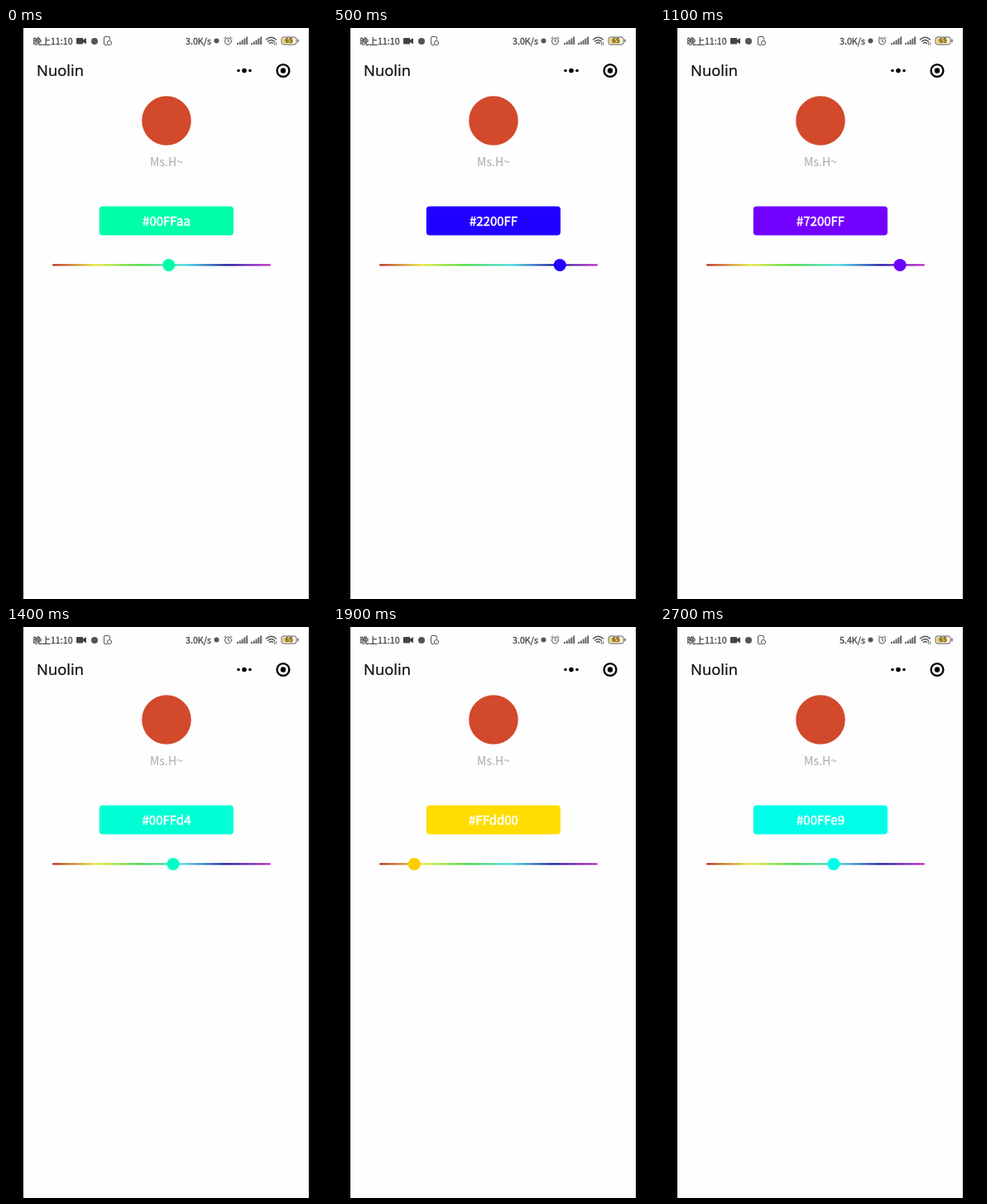
Recreate the animation shown at these times as an HTML page. Size 388 by 690 pixels, loop 2800 ms.

```html
<!DOCTYPE html>
<html lang="zh-CN">
<head>
<meta charset="utf-8">
<style>
  html, body { margin: 0; height: 100%; overflow: hidden; background: #000; }
  svg { display: block; width: 388px; height: 690px; font-family: "Noto Sans CJK SC", "Noto Sans CJK JP", "Noto Sans", sans-serif; }
  .line { fill: none; stroke: #555; stroke-linecap: round; stroke-linejoin: round; }
  .bars { fill: none; stroke: #666; stroke-width: 2; }
  .status { font-size: 10.7px; fill: #444; stroke: #444; stroke-width: .3px; }
  .title { font: 18.3px "Noto Sans", sans-serif; fill: #111; stroke: #111; stroke-width: .2px; }
  .label { font-size: 15px; fill: #fff; stroke: #fff; stroke-width: .5px; }
</style>
</head>
<body>
<svg viewBox="0 0 388 690">
  <defs>
    <linearGradient id="rainbow">
      <stop offset="0" stop-color="#b82418"/>
      <stop offset=".2" stop-color="#e8e838"/>
      <stop offset=".4" stop-color="#40d840"/>
      <stop offset=".6" stop-color="#48dce0"/>
      <stop offset=".8" stop-color="#1414a0"/>
      <stop offset="1" stop-color="#c428c4"/>
    </linearGradient>
    <path id="signal" class="bars" d="M0 20v-2M2.800 20v-3.500M5.600 20v-5.500M8.400 20v-7.500M11.200 20v-9.500"/>
  </defs>
  <rect x="21" width="345" height="690" fill="#fdfefd"/>

  <!-- status bar -->
  <text class="status" x="32.5" y="19.5">晚上11:10</text>
  <path d="M86 12h7v2.200l4-2v7l-4-2v2.300h-7q-1 0-1-1v-5.500q0-1 1-1z" fill="#444"/>
  <circle cx="107" cy="16" r="4" fill="#555"/>
  <path d="M122 20.500h-2q-1.500 0-1.500-1.500v-7q0-1.500 1.500-1.500h4q1.500 0 1.500 1.500v2" class="line"/>
  <circle cx="125" cy="18" r="2.600" class="line"/>
  <text id="speed" class="status" x="217" y="19.500"></text>
  <circle cx="254.500" cy="15.500" r="3" fill="#555"/>
  <g class="line">
    <circle cx="268.500" cy="16" r="4"/>
    <path d="M268.500 13.800v2.400l1.800 1M263.800 12.600l2-1.800M273.200 12.600l-2-1.800"/>
  </g>
  <use href="#signal" x="280"/>
  <use href="#signal" x="297"/>
  <path d="M314.500 14q6-5.500 12 0M316.500 16.300q4-3.500 8 0M318.500 18.400q2-1.700 4 0" class="line" stroke-width="1.400"/>
  <path d="M324.500 17.500v3M326.500 17.500v3" class="line" stroke-width=".8"/>
  <rect x="333" y="11" width="18" height="9" rx="2.500" fill="#fff" stroke="#555"/>
  <rect x="334.500" y="12.500" width="13" height="6" rx="1" fill="#efc64a"/>
  <path d="M353 14.200v2.600" class="line" stroke-width="1.300"/>
  <text x="342" y="18.300" font-size="7.500" font-weight="700" text-anchor="middle" fill="#444">65</text>

  <!-- title bar -->
  <text class="title" x="37" y="58.300">Nuolin</text>
  <circle cx="281" cy="51.500" r="1.800"/>
  <circle cx="288" cy="51.500" r="2.800"/>
  <circle cx="295" cy="51.500" r="1.800"/>
  <circle cx="335" cy="51.500" r="7.400" fill="none" stroke="#000" stroke-width="2.400"/>
  <circle cx="335" cy="51.500" r="3.200"/>

  <!-- profile and colour picker -->
  <circle cx="194" cy="112" r="29.800" fill="#d2492c"/>
  <text x="194" y="167" font-size="14" text-anchor="middle" fill="#aaa">Ms.H~</text>
  <rect id="button" x="112.800" y="215.600" width="162.200" height="35" rx="4"/>
  <text id="label" class="label" x="194" y="239" text-anchor="middle"></text>
  <rect x="56" y="285.300" width="264" height="2.200" rx="1.100" fill="url(#rainbow)"/>
  <circle id="knob" cy="286.500" r="7.600"/>
</svg>
<script>
const LOOP = 2800, STEP = 100;
// time, knob value, label value (the label trails the drag slightly)
const KEYS = [
  [0, 160, 160], [500, 248, 248], [800, 282, 283], [1000, 285, 285],
  [1200, 246, 249], [1400, 166, 170], [1900, 48, 52], [2000, 36, 38],
  [2100, 42, 40], [2300, 88, 85], [2700, 175, 175]
];
const [speed, button, label, knob] =
  ["speed", "button", "label", "knob"].map(id => document.getElementById(id));

function valueAt(time, column) {
  const next = Math.max(1, KEYS.findIndex(key => key[0] >= time));
  const a = KEYS[next - 1], b = KEYS[next];
  const progress = (time - a[0]) / (b[0] - a[0]);
  return Math.round(a[column] + (b[column] - a[column]) * progress);
}

function hueToHex(hue) {
  const part = Math.floor(hue % 60 / 60 * 255);
  const up = part, down = 255 - part;
  const rgb = [
    [255, up, 0], [down, 255, 0], [0, 255, up],
    [0, down, 255], [up, 0, 255], [255, 0, down]
  ][Math.floor(hue / 60)];
  return "#" + rgb.map(c => c === 255 ? "FF" : c.toString(16).padStart(2, "0")).join("");
}

function draw(now) {
  const time = Math.floor(now % LOOP / STEP) * STEP;
  const position = valueAt(time, 1);
  const color = hueToHex(valueAt(time, 2));
  knob.setAttribute("cx", 56 + position * 0.88);
  knob.setAttribute("fill", hueToHex(position));
  button.setAttribute("fill", color);
  label.textContent = color;
  speed.textContent = time < 2500 ? "3.0K/s" : "5.4K/s";
}

const start = performance.now();
function tick() {
  draw(performance.now() - start);
  requestAnimationFrame(tick);
}
tick();
</script>
</body>
</html>
```
